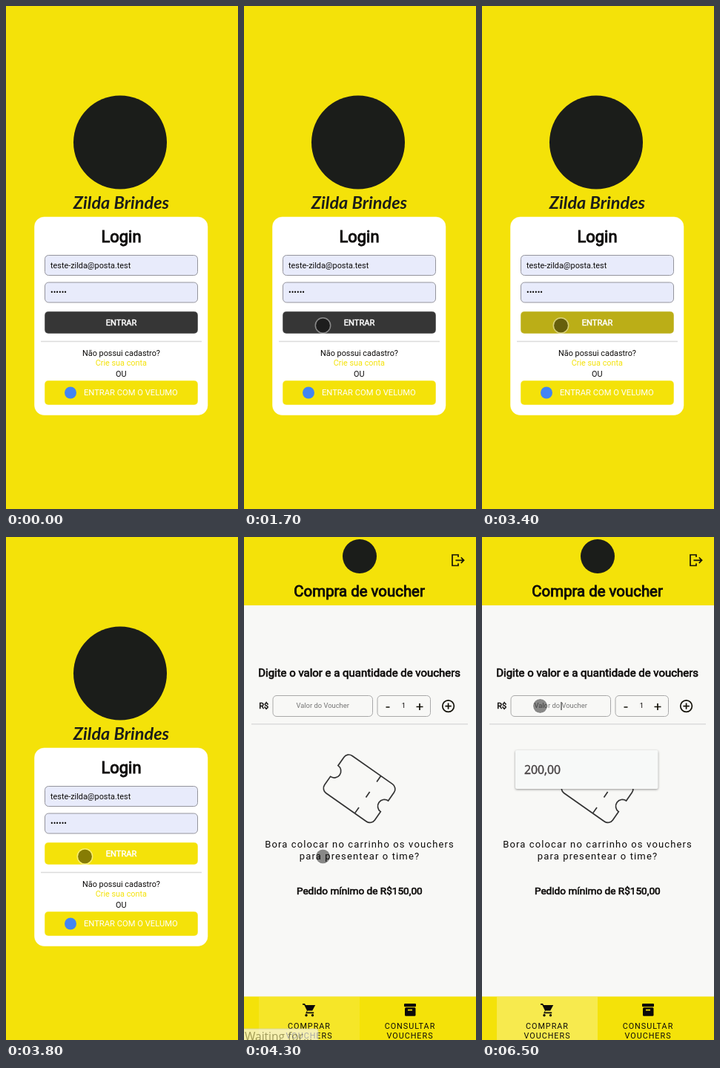
An HTML page for the animation above (8 s loop, 313 by 677 pixels).

```html
<!DOCTYPE html>
<html lang="pt-BR">
<head>
<meta charset="utf-8">
<title>Compra de voucher</title>
<style>
  html, body { margin: 0; width: 100%; height: 100%; overflow: hidden; background: #f4e209; }
  svg { display: block; width: 100%; height: 100%; }
  text { font: 10.85px Roboto, sans-serif; fill: #0c0a09; }
  .mid { text-anchor: middle; }
  .heavy { stroke: #0c0a09; stroke-width: .045em; }
  .light { fill: #fff; }
  .yellow { fill: #f4e209; }
  .brand { font: italic bold 23.5px Lato, sans-serif; fill: #1b1d1a; }
  .login { font-size: 21.9px; }
  .title { font-size: 20.4px; }
  .prompt { font-size: 14.95px; }
  .hint { font-size: 13px; letter-spacing: 1.13px; }
  .minimum { font-size: 13.6px; }
  .small { font-size: 9.4px; }
  .nav { font-size: 10.8px; letter-spacing: 1px; }
  .system { font-family: "Open Sans", sans-serif; }
  .field { fill: #e8ebfb; stroke: #94949c; }
  .soft { stroke: #fff; stroke-opacity: .5; }
  .outline { fill: none; stroke: #a9a9a9; }
  .rule { stroke: #dcdcdc; stroke-width: 1.4; }
  .icon { fill: none; stroke: #15130a; stroke-width: 1.7; }
  .ticket { fill: none; stroke: #333; stroke-width: 1.7; }
  .solid { fill: #0c0a09; }
</style>
</head>
<body>
<svg viewBox="0 0 313 677">
  <g id="login">
    <rect class="yellow" width="313" height="677"/>
    <circle cx="154" cy="183.5" r="63" fill="#1b1d1a"/>
    <text class="brand mid" x="155.5" y="273">Zilda Brindes</text>
    <rect class="soft" x="38.5" y="284" width="233.5" height="266.5" rx="13" fill="#fff"/>
    <text class="login heavy mid" x="155.5" y="318">Login</text>
    <rect class="field" x="52.5" y="335.5" width="206" height="27" rx="5"/>
    <text x="60" y="353">teste-zilda@posta.test</text>
    <rect class="field" x="52.5" y="372" width="206" height="27" rx="5"/>
    <text x="60" y="388.5">••••••</text>
    <rect class="soft" id="enter" x="52" y="411" width="207" height="30" rx="5"/>
    <text class="light mid" x="155.5" y="430" style="font-size:11.1px;stroke:#fff;stroke-width:.045em">ENTRAR</text>
    <path class="rule" d="M47 451.5H264"/>
    <text class="mid" x="155.5" y="471">Não possui cadastro?</text>
    <text class="yellow mid" x="155.3" y="484">Crie sua conta</text>
    <text class="mid" x="155.3" y="499">OU</text>
    <rect class="yellow soft" x="52" y="504" width="207" height="33" rx="5"/>
    <circle cx="87" cy="520.5" r="8" fill="#4285f4"/>
    <text class="light" x="105" y="524" style="font-size:11.2px">ENTRAR COM O VELUMO</text>
  </g>

  <g id="shop">
    <rect width="313" height="677" fill="#f8f8f6"/>
    <rect id="header" class="yellow" width="313" height="92"/>
    <circle id="logo" cx="156" cy="26" r="23" fill="#1b1d1a"/>
    <g id="heading">
      <text class="title heavy mid" x="155.6" y="80">Compra de voucher</text>
      <path class="icon" d="M289 27V24H281V38.5H289V35.5M285.5 31.3H296.5M292.8 27.5l3.8 3.8-3.8 3.8"/>
    </g>
    <text class="prompt heavy mid" x="155.6" y="188">Digite o valor e a quantidade de vouchers</text>
    <text class="heavy" x="20.3" y="231">R$</text>
    <rect class="outline" x="39" y="213.5" width="134.5" height="28" rx="5"/>
    <text class="small mid" x="106.2" y="230" style="fill:#757575">Valor do Voucher</text>
    <rect class="outline" x="180" y="213.5" width="71.5" height="28" rx="5"/>
    <path class="icon" d="M191.5 229H196.5M232.5 228.5H241.5M237 224V233"/>
    <text class="small mid" x="215.3" y="230">1</text>
    <circle class="icon" cx="275.6" cy="227.6" r="7.8"/>
    <path class="icon" d="M271.4 227.6H279.8M275.6 223.4V231.8"/>
    <path class="rule" d="M10 251.8H302"/>
    <g class="ticket" transform="translate(155.6 338.7) rotate(35)">
      <path d="M-33.3-30.7H33.3a8 8 0 0 1 8 8V-9a9 9 0 0 0 0 18V22.7a8 8 0 0 1-8 8H-33.3a8 8 0 0 1-8-8V9a9 9 0 0 0 0-18V-22.7a8 8 0 0 1 8-8Z"/>
      <path d="M14-30.7v9.7M14-4.5v9M14 21v9.7"/>
    </g>
    <text class="hint mid" x="156" y="418">Bora colocar no carrinho os vouchers</text>
    <text class="hint mid" x="156" y="434">para presentear o time?</text>
    <text class="minimum heavy mid" x="155.8" y="481">Pedido mínimo de R$150,00</text>

    <rect class="yellow" y="618.5" width="313" height="59"/>
    <rect id="active" x="20" y="619" width="136" height="58" fill="#fff"/>
    <g class="solid">
      <path d="M79 628h3l1.2 2h13l-4 7.5h-6.5l-1 2h9.5v1.7h-11.2l2-3.8-3.8-7.7H79z"/>
      <circle cx="84" cy="643.7" r="1.7"/>
      <circle cx="92.5" cy="643.7" r="1.7"/>
      <rect x="216" y="628" width="16" height="4.3" rx="1"/>
      <rect x="217" y="633.2" width="14.5" height="11.5" rx="1.5"/>
    </g>
    <rect class="yellow" x="221" y="635.8" width="6" height="1.7"/>
    <text class="nav mid" x="88" y="662">COMPRAR</text>
    <text class="nav mid" x="88" y="675">VOUCHERS</text>
    <text class="nav mid" x="224" y="662">CONSULTAR</text>
    <text class="nav mid" x="224" y="675">VOUCHERS</text>

    <g id="status">
      <path d="M-1 662H97a3 3 0 0 1 3 3V678H-1z" fill="#f6f6f4" stroke="#d0d0c8"/>
      <text class="system" x="1" y="678" style="font-size:15.5px;fill:#777">Waiting for…</text>
    </g>
    <g id="suggestion">
      <rect x="45" y="287" width="192.5" height="52" rx="2" fill="#f7f9f8" style="filter:drop-shadow(0 1px 1.5px #0006)"/>
      <text class="system" x="57" y="319" style="font-size:15.8px;fill:#443f40;stroke:#443f40;stroke-width:.4">200,00</text>
      <path d="M107 222V233" stroke="#111"/>
    </g>
  </g>

  <g id="pointer">
    <circle r="9.5" fill="#000" fill-opacity=".45"/>
    <circle r="10.2" fill="none" stroke="#fff" stroke-opacity=".42" stroke-width="1.5"/>
  </g>
</svg>
<script>
const LOOP = 8000, STEP = 100;
const el = id => document.getElementById(id);
const clamp = v => Math.min(1, Math.max(0, v));
const show = (id, opacity) => { el(id).style.opacity = Number(opacity); };

// Pointer positions: [time, x, y], each held until the next.
const trail = [
  [500, 13, 447], [600, 31, 444], [700, 51.5, 440.5],
  [900, 57, 441], [1000, 66, 441], [1100, 77.5, 439], [1200, 86, 434], [1300, 91, 431],
  [1500, 96, 431], [1600, 103, 430], [1700, 106.5, 430],
  [5300, 104.5, 384], [5400, 86, 298],
  [5600, 85, 290], [5700, 82, 262], [5800, 80, 240], [5900, 78.5, 227.5]
];

function mix(from, to, p) {
  return `rgb(${from.map((c, i) => Math.round(c + (to[i] - c) * p))})`;
}

function draw(t) {
  const hover = clamp((t - 3050) / 550);
  el('enter').style.fill = mix([54, 54, 54], [244, 226, 9], hover * hover * (3 - 2 * hover));

  const logoLoaded = t >= 4000;
  show('shop', t >= 3900);
  show('logo', logoLoaded);
  el('header').setAttribute('height', logoLoaded ? 92 : 53);
  el('heading').setAttribute('transform', `translate(0 ${logoLoaded ? 0 : -39})`);
  show('active', 0.28 * clamp((t - 3900) / 900));
  show('status', 1 - clamp((t - 4200) / 300));
  show('suggestion', t >= 6500);

  const spot = trail.findLast(p => p[0] <= t);
  show('pointer', !!spot);
  if (spot) el('pointer').setAttribute('transform', `translate(${spot[1]} ${spot[2]})`);
}

function tick() {
  draw(Math.floor(performance.now() % LOOP / STEP) * STEP);
  requestAnimationFrame(tick);
}
tick();
</script>
</body>
</html>
```
